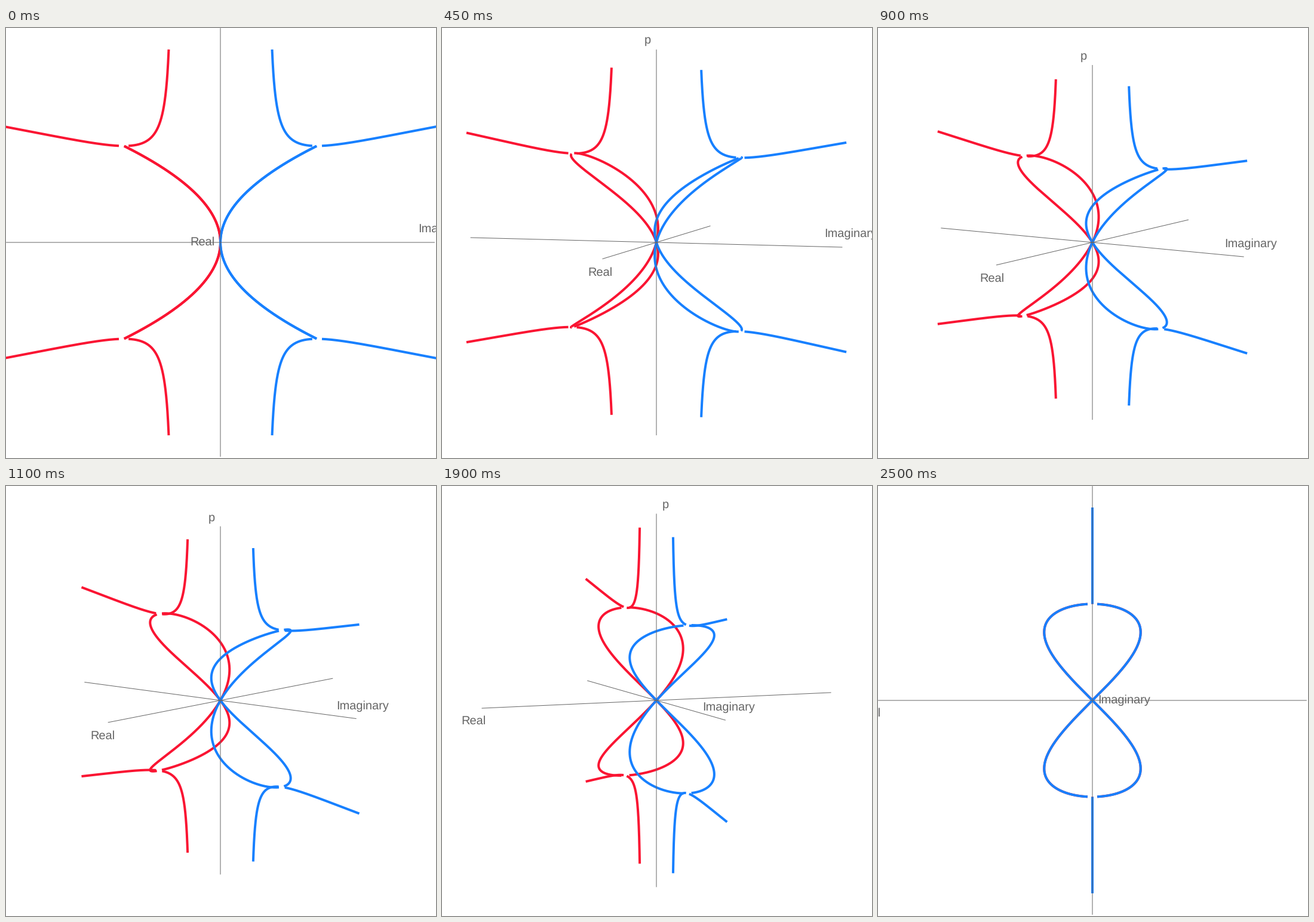
Recreate the animation shown at these times as a matplotlib script. Size 720 by 720 pixels, loop 2.55 s.

```python
import numpy as np
import matplotlib.pyplot as plt
from matplotlib.animation import FuncAnimation

SIZE, MID = 720, 359
FRAMES = 51
UNIT = 161.5          # pixels per unit at full zoom
HALF_AXIS = 2.222     # half length of each axis, in units
RED, BLUE, GRAY = "#fa1432", "#1780ff", "#666666"

plt.rcParams["font.family"] = "Liberation Sans"
plt.rcParams["text.hinting"] = "none"

fig = plt.figure(figsize=(SIZE / 72, SIZE / 72), dpi=72, facecolor="white")
ax = fig.add_axes([0, 0, 1, 1])
ax.set_xlim(0, SIZE)
ax.set_ylim(SIZE, 0)
ax.axis("off")


def branches():
    """Pieces (real, imag, p) of x = p*sqrt(1 - p^2) + i*p^2."""
    gap = 0.05
    t = np.linspace(gap - np.pi / 2, np.pi / 2 - gap, 300)
    for side in (1, -1):
        yield side * np.sin(t) * np.cos(t), np.sin(t) ** 2, np.sin(t)
    inner = np.linspace(gap, np.arccosh(2), 150)
    outer = np.linspace(gap, 0.5 * np.log(2 * 2.27 - 1), 150)
    for u, sign in ((inner, -1), (outer, 1)):
        for up in (1, -1):
            yield 0 * u, np.cosh(u) * np.exp(sign * u), up * np.cosh(u)


def make_line(color, width):
    return ax.plot([], [], color=color, lw=width, solid_capstyle="butt",
                   solid_joinstyle="round", snap=False)[0]


curves = []
for color, sign in ((RED, -1), (BLUE, 1)):
    for re, im, p in branches():
        curves.append((make_line(color, 4), re, sign * im, p))

ends = HALF_AXIS * np.eye(3)
axis_lines = [make_line(GRAY, 1) for _ in ends]
labels = [ax.text(0, 0, name, color=GRAY, fontsize=20, va="baseline")
          for name in ("Real", "Imaginary", "p")]


def camera(n):
    """Quarter turn with a slight rise and zoom out in the middle."""
    turn = n / (FRAMES - 1)
    bump = np.sin(np.pi * turn)
    az = np.pi / 2 * turn
    el = np.radians(9.5) * bump
    scale = UNIT * (1 - 0.18 * bump)

    def project(re, im, p):
        x = im * np.cos(az) - re * np.sin(az)
        depth = im * np.sin(az) + re * np.cos(az)
        y = depth * np.sin(el) - p * np.cos(el)
        return MID + scale * x, MID + scale * y

    return project


def place(label, x, y, side, shift):
    """Put a label beside its anchor (side) or above/below it (shift)."""
    label.set_ha({-1: "right", 0: "center", 1: "left"}[side])
    label.set_position((x + 9.5 * side, y + shift + 4.5))


def draw(n):
    project = camera(n)
    for line, re, im, p in curves:
        line.set_data(*project(re, im, p))
    for line, end in zip(axis_lines, ends):
        (x0, y0), (x1, y1) = project(*-end), project(*end)
        line.set_data([x0, x1], [y0, y1])

    real, imag, up = (project(*(1.045 * end)) for end in ends)
    first, last = n == 0, n == FRAMES - 1
    place(labels[0], *real, -1 if first else 0, 0 if first else 22)
    place(labels[1], *imag, 1 if last else 0, 0 if last else -22)
    place(labels[2], *up, 1 if n > FRAMES // 2 else -1, 0)
    return [c[0] for c in curves] + axis_lines + labels


anim = FuncAnimation(fig, draw, frames=FRAMES, interval=50,
                     repeat=True, repeat_delay=0)
plt.show()
```
